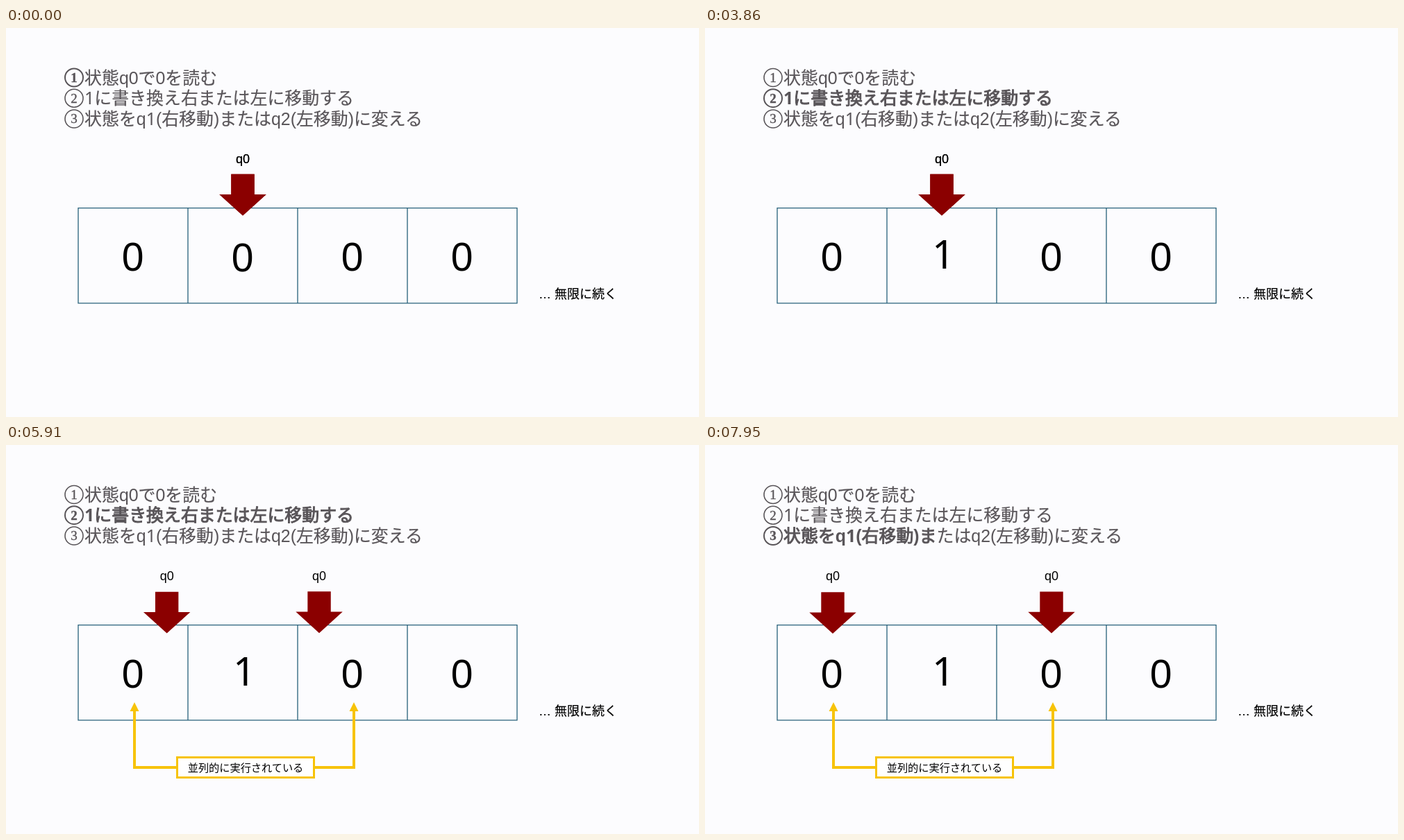
These frames come from a looping animation (998x561 px, 7990 ms). An HTML page:

```html
<!DOCTYPE html>
<html lang="ja">
<head>
<meta charset="utf-8">
<title>Nondeterministic tape</title>
<style>
  html, body { margin: 0; width: 100%; height: 100%; overflow: hidden; background: #fcfcfe; }
  svg { display: block; width: 100%; height: 100%; }
  text { font-family: "Liberation Sans", "Noto Sans CJK JP", "Noto Sans CJK", sans-serif; fill: #000; white-space: pre; }
  .line text { font-size: 24.9px; fill: #595559; }
  .line .k { stroke: #595559; stroke-width: .2; }
  .line .num { font: 19px "Liberation Serif", serif; text-anchor: middle; stroke: #595559; stroke-width: .4; }
  .line circle { fill: none; stroke: #595559; stroke-width: 1.6; }
  .line .b { font-weight: 700; }
  .line .k.b { font-weight: 400; stroke-width: 1; }
  .line circle.b { stroke-width: 2; }
  .one { font-family: "Noto Sans", sans-serif; }
  .digit { font-size: 57px; text-anchor: middle; }
  .state { font-size: 18px; text-anchor: middle; }
  .tape { fill: none; stroke: #27617a; stroke-width: 1.3; }
  .note { font-size: 18px; stroke: #000; stroke-width: .2; }
  .call { font-size: 15.2px; text-anchor: middle; }
  .wire { fill: none; stroke: #f7c308; stroke-width: 4; }
  .tip { fill: #f7c308; }
</style>
</head>
<body>
<svg viewBox="0 0 998 561" id="stage">
  <g id="lines"></g>
  <path class="tape" d="M104 259.7H736V396.8H104ZM262 259.7V396.8M420 259.7V396.8M578 259.7V396.8"/>
  <text class="digit" x="182.5" y="349.5">0</text>
  <text class="digit" x="340.7" y="350.5" id="zero">0</text>
  <text class="digit one" x="343.2" y="346.7" id="one">1</text>
  <text class="digit" x="498.7" y="349.5">0</text>
  <text class="digit" x="656.7" y="349.5">0</text>
  <text class="note" x="767" y="389.5">… 無限に続く</text>
  <g id="callout">
    <path class="wire" d="M246 465H185V382M444 465H501V382"/>
    <path class="tip" d="M185 371l6.5 13h-13zM501 371l6.5 13h-13z"/>
    <rect x="246.5" y="450.5" width="197" height="29" fill="#fff" stroke="#f7c308" stroke-width="3"/>
    <text class="call" x="345" y="471">並列的に実行されている</text>
  </g>
  <g id="heads"></g>
</svg>
<script>
const NS = 'http://www.w3.org/2000/svg';
const LOOP = 7990, STEP = 60;
const WRITE = 3250, MOVE = 4730, MOVE_MS = 2000, FLY_MS = 500;
const rows = [
  { text: '状態q0で0を読む', y: 71.5, on: -30, off: 1760 },
  { text: '1に書き換え右または左に移動する', y: 101.2, on: 1760, off: 7250 },
  { text: '状態をq1(右移動)またはq2(左移動)に変える', y: 131, on: 7250, off: Infinity }
];
const headMoves = [{ dx: -157, dy: 1.4 }, { dx: 158, dy: 0.8 }];
const $ = id => document.getElementById(id);

function add(parent, tag, attrs, text) {
  const el = document.createElementNS(NS, tag);
  for (const k in attrs) el.setAttribute(k, attrs[k]);
  if (text) el.textContent = text;
  return parent.appendChild(el);
}

const kind = c => c === '1' ? 'one' : c > '~' ? 'k' : 'l';

rows.forEach((row, i) => {
  const g = add($('lines'), 'g', { class: 'line' });
  row.ring = add(g, 'circle', { cx: 98, cy: row.y, r: 13 });
  row.num = add(g, 'text', { class: 'num', x: 98, y: row.y + 6.3 }, String(i + 1));
  const t = add(g, 'text', { x: 113.1, y: row.y + 9 });
  row.chars = [...row.text].map(c => add(t, 'tspan', { class: kind(c) }, c));
});

const heads = headMoves.map(({ dx, dy }) => {
  const g = add($('heads'), 'g', {});
  add(g, 'text', { class: 'state', x: 341, y: 194.7 }, 'q0');
  const arrow = add(g, 'path', { d: 'M324.3 210.8H357.7V240H374.7L341 270.6L307.3 240H324.3Z', fill: '#8b0000' });
  return { g, arrow, dx, dy };
});

const clamp = v => Math.min(1, Math.max(0, v));
const ease = p => p < .5 ? Math.pow(2 * p, 2.5) / 2 : 1 - Math.pow(2 - 2 * p, 2.5) / 2;

function draw(t) {
  for (const r of rows) {
    const count = t >= r.on && t < r.off ? Math.floor((t - r.on) / STEP) + 1 : 0;
    [r.ring, r.num].forEach(el => el.classList.toggle('b', count > 0));
    r.chars.forEach((el, i) => el.classList.toggle('b', i + 1 < count));
  }
  const written = t >= WRITE;
  $('zero').style.visibility = written ? 'hidden' : 'visible';
  $('one').style.visibility = written ? 'visible' : 'hidden';

  const p = ease(clamp((t - MOVE) / MOVE_MS));
  for (const h of heads) {
    h.g.setAttribute('transform', `translate(${h.dx * p} 0)`);
    h.arrow.setAttribute('transform', `translate(0 ${h.dy * p})`);
  }
  const fly = clamp((t - MOVE) / FLY_MS);
  $('callout').setAttribute('transform', `translate(0 ${190 * (1 - fly)})`);
}

const start = performance.now();
function tick() {
  draw((performance.now() - start) % LOOP);
  requestAnimationFrame(tick);
}
draw(0);
requestAnimationFrame(tick);
</script>
</body>
</html>
```
